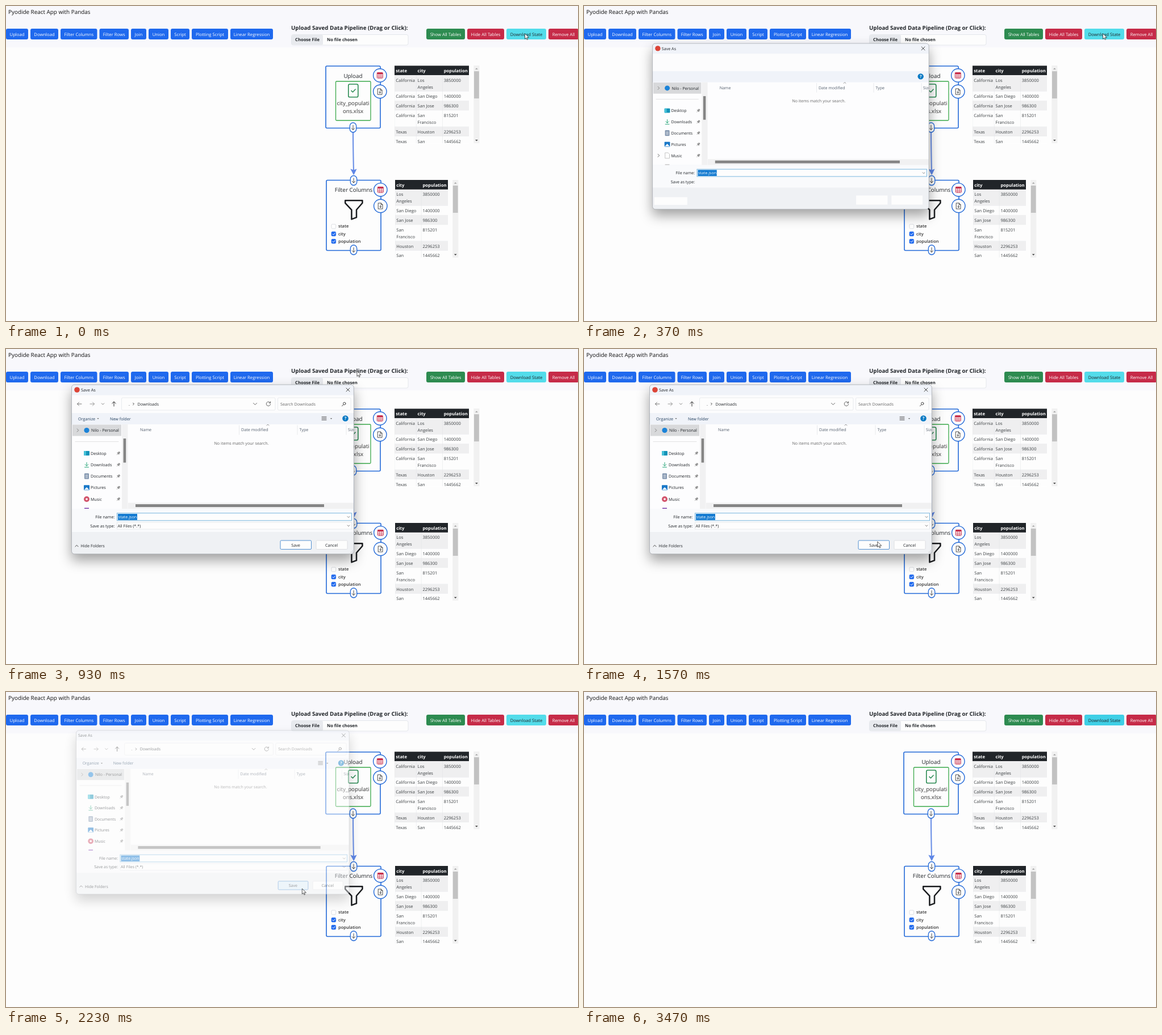
An HTML page for the animation above (3510 ms loop, 1007 by 556 pixels).

```html
<!DOCTYPE html>
<html lang="en">
<head>
<meta charset="utf-8">
<title>Data pipeline</title>
<style>
html, body { margin: 0; width: 100%; height: 100%; overflow: hidden; background: #fdfdfd; }
svg { display: block; width: 1007px; height: 556px; }
text { font-family: "Open Sans", "Noto Sans", sans-serif; text-rendering: geometricPrecision; white-space: pre; }
#dialog { filter: drop-shadow(0 11px 11px rgba(0, 0, 0, .36)); }
</style>
</head>
<body>
<svg id="stage" viewBox="0 0 1007 556"></svg>
<script>
const LOOP = 3510, BLUE = '#1f69ee', EDGE = '#2269d8', INK = '#212529';

// Shape helpers, each returning SVG markup
const rect = (x, y, x2, y2, fill, rest = '') =>
  `<rect x="${x}" y="${y}" width="${x2 - x}" height="${y2 - y}" fill="${fill}" ${rest}/>`;
const path = (d, stroke, width = 1, fill = 'none') =>
  `<path d="${d}" stroke="${stroke}" stroke-width="${width}" fill="${fill}" stroke-linecap="round" stroke-linejoin="round"/>`;
const disc = (x, y, r, fill, rest = '') => `<circle cx="${x}" cy="${y}" r="${r}" fill="${fill}" ${rest}/>`;
const text = (x, y, s, size, fill = INK, anchor = 'start', weight = 400) =>
  `<text x="${x}" y="${y}" font-size="${size}" fill="${fill}" text-anchor="${anchor}" font-weight="${weight}">${s}</text>`;
const border = (color, width, r) => `stroke="${color}" stroke-width="${width}" rx="${r}"`;
const chevron = (x, y, dir, color = '#555', s = 2.6) => path({
  down: `M${x - s} ${y - s / 2}l${s} ${s}l${s} ${-s}`,
  up: `M${x - s} ${y + s / 2}l${s} ${-s}l${s} ${s}`,
  right: `M${x - s / 2} ${y - s}l${s} ${s}l${-s} ${s}`
}[dir], color, .9);
const triangle = (x, y, s, color) => `<path d="M${x - Math.abs(s)} ${y - s / 2}h${2 * Math.abs(s)}l${-Math.abs(s)} ${s}z" fill="${color}"/>`;

const button = (x, x2, label, fill = BLUE, id = '') =>
  rect(x, 40, x2, 59, fill, `rx="3" ${id && `id="${id}"`}`) + text((x + x2) / 2, 52.5, label, 7.7, id ? INK : '#fff', 'middle');

function header() {
  const tools = [[0, 39, 'Upload'], [43, 92, 'Download'], [96, 160.5, 'Filter Columns'], [164.5, 216, 'Filter Rows'],
    [220, 247, 'Join'], [251, 286, 'Union'], [290, 323, 'Script'], [327, 391, 'Plotting Script'], [395, 470, 'Linear Regression']];
  return rect(0, 0, 1007, 73, '#f8f8fc') +
    text(4, 13.7, 'Pyodide React App with Pandas', 9.9, '#111') +
    tools.map(b => button(...b)).join('') +
    text(502, 42.3, 'Upload Saved Data Pipeline (Drag or Click):', 9.7, INK, 'start', 700) +
    rect(502.5, 50.5, 708, 69, '#fdfdfd', border('#dfe2e7', .8, 3)) +
    rect(503, 51, 558, 68.5, '#e8eaee', 'rx="2"') +
    text(530.5, 62.4, 'Choose File', 7.6, INK, 'middle', 700) +
    text(565, 62.4, 'No file chosen', 7.6, INK, 'start', 700) +
    button(740, 808, 'Show All Tables', '#2d8b50') +
    button(812, 877, 'Hide All Tables', '#c62b48') +
    button(881, 951, 'Download State', '#53dcea', 'hover') +
    button(955, 1008, 'Remove All', '#c62b48');
}

const pill = (x, y) =>
  rect(x - 5.7, y - 8.5, x + 5.7, y + 8.5, '#fdfdfd', border(EDGE, 1.3, 5.7)) +
  path(`M${x} ${y - 4}v8m-2.8 -2.8l2.8 2.8l2.8 -2.8`, '#222', .8);

const ring = (x, y) => disc(x, y, 11.7, '#fdfdfd', `stroke="${EDGE}" stroke-width="1.4"`);

// Round table and download toggles on a node's right edge
const toggles = (x, y) =>
  ring(x, y) + rect(x - 5, y - 5, x + 5, y + 5, '#fff', border('#c62b48', .9, 1)) +
  rect(x - 5, y - 5, x + 5, y - 2, '#c62b48', 'rx="1"') +
  path(`M${x - 5} ${y + .6}h10M${x - 5} ${y + 3}h10M${x - 1.7} ${y - 2}v7M${x + 1.7} ${y - 2}v7`, '#c62b48', .7) +
  ring(x, y + 28.6) +
  path(`M${x - 3.7} ${y + 23.6}h4.8l2.6 2.6v7.6h-7.4zM${x + 1} ${y + 23.8}v2.6h2.5M${x} ${y + 27.4}v4m-1.6 -1.5l1.6 1.5l1.6 -1.5`, '#222', .8);

const node = (x, y, h, title) =>
  rect(x, y, x + 96, y + h, '#fdfdfd', border(EDGE, 1.6, 2)) + text(x + 48, y + 20.6, title, 9.9, INK, 'middle');

function checkbox(y, label, on) {
  return rect(573, y, 580.6, y + 7.6, on ? BLUE : '#fff', border(on ? BLUE : '#cfd3d8', .7, 1.6)) +
    (on ? path(`M574.8 ${y + 4}l1.6 1.6l2.8 -3.2`, '#fff', 1) : '') +
    text(585, y + 6.2, label, 7.5, '#333', 'start', 600);
}

function nodes() {
  return path('M611 222Q611 250 612 291', '#6a8fe6', 2.1) +
    '<path d="M606.3 287.5l5.8 2l5.5 -2l-5.4 11z" fill="#5f87e6"/>' +
    node(563, 106, 109.5, 'Upload') +
    rect(580.5, 133, 642, 202, '#fdfdfd', border('#3aa94a', 1.3, 1.5)) +
    rect(602.8, 138, 619.8, 160.8, 'none', border('#2a8a52', 1.6, 2.4)) +
    path('M608 149.6l2.5 2.4l4.6 -5', '#2a8a52', 1.5) +
    text(611, 174.6, 'city_populati', 9.7, '#333', 'middle') + text(611, 189.4, 'ons.xlsx', 9.7, '#333', 'middle') +
    toggles(658.3, 122.4) + pill(611, 214.5) +
    node(564, 307.5, 124, 'Filter Columns') +
    path('M597.2 343.2h30.2v4.6l-10.4 12v13.4l-8.6 3.2v-16.6l-11.2 -12z', '#1b1d20', 2.5) +
    checkbox(385.2, 'state') + checkbox(398.4, 'city', 1) + checkbox(411.5, 'population', 1) +
    toggles(659.3, 324.3) + pill(612, 308) + pill(612, 430.5);
}

const CITIES = [['California', 'Los Angeles', 3850000], ['California', 'San Diego', 1400000], ['California', 'San Jose', 986300],
  ['California', 'San Francisco', 815201], ['Texas', 'Houston', 2296253], ['Texas', 'San', 1445662]];

// cols: [left edge, heading, index into a row]
function table(y, cols, right, barX, clip) {
  const left = cols[0][0];
  let out = '', top = y + 16.8;
  CITIES.forEach((row, i) => {
    const wraps = /Angeles|Francisco/.test(row[1]), h = wraps ? 28.8 : 16.8;
    out += rect(left, top, right, top + h, i % 2 ? '#fdfdfd' : '#efeff0') + path(`M${left} ${top + h}H${right}`, '#dfe1e4', .5);
    for (const [x, , k] of cols) {
      const lines = k === 1 && wraps ? row[1].split(' ') : [row[k]];
      lines.forEach((s, n) => out += text(x + 2.3, top + 11.5 + 12 * n, s, 7.5, '#3c4043'));
    }
    top += h;
  });
  out += cols.map(([x]) => path(`M${x} ${y}V${top}`, '#dfe1e4', .5)).join('') + rect(left, y, right, y + 16.8, INK) +
    cols.map(([x, s]) => text(x + 2.3, y + 11.6, s, 7.7, '#fff', 'start', 700)).join('');
  return `<clipPath id="${clip}">${rect(left, y, right, y + 137, '#000')}</clipPath><g clip-path="url(#${clip})">${out}</g>` +
    rect(barX, y, barX + 10, y + 137, '#f1f1f1') + rect(barX + .6, y + 10, barX + 9.4, y + 58, '#c2c2c2') +
    triangle(barX + 5, y + 5.4, -2.4, '#9a9a9a') + triangle(barX + 5, y + 132, 2.4, '#444');
}

function tree() {
  const pin = y => path(`M195.4 ${y + 2.6}l2 -2m-1.4 -1.2l2.8 2.8l.3 -1.7l1.7 -1.6l-1.8 -1.8l-1.5 1.7z`, '#777', .7, '#999');
  const page = y => path(`M138.5 ${y - 5}h5l2.5 2.5v7.5h-7.5z`, '#aaa', .7, '#fff');
  const icons = [
    y => rect(137, y - 4, 147, y + 4, '#1593b8', 'rx="1"') + rect(137, y - 4, 141, y + 4, '#45c1d8', 'rx="1"'),
    y => path(`M142 ${y - 4}v6m-2.8 -2.6l2.8 2.8l2.8 -2.8M138.5 ${y + 4.4}h7`, '#27a579', 1),
    y => rect(138, y - 5, 146, y + 5, '#7f93ad', 'rx="1"') + path(`M140 ${y - 2}h4m-4 2.2h4m-4 2.2h4`, '#fff', .8),
    y => rect(137, y - 4.5, 147, y + 4.5, '#1978c8', 'rx="1"') + path(`M138 ${y + 3.6}l4 -4.2l4 4.2z`, '#fff', .4, '#fff'),
    y => `<g class="full">${disc(142, y, 5, '#d2546c')}${disc(142, y, 1.8, '#fff')}</g><g class="bare">${page(y)}${chevron(126.5, y, 'right')}</g>`
  ];
  return rect(117, 133.5, 203, 153.5, '#d8d9db') + chevron(126.5, 143.5, 'right', '#777') + disc(142, 143.5, 4.6, '#1b83d8') +
    text(150, 146.2, 'Nilo - Personal', 7.2) + path('M122 163.5H198', '#dcdcdc', .8) +
    ['Desktop', 'Downloads', 'Documents', 'Pictures', 'Music'].map((s, i) => {
      const y = 184 + 20.25 * i;
      return icons[i](y) + text(149, y + 2.7, s, 7.2) + pin(y);
    }).join('') +
    `<g class="full">${rect(138, 280.4, 146, 282, '#8044b0')}</g><g class="bare">${rect(138, 280.8, 146, 282, '#bbb')}</g>` +
    rect(204, 133, 214.5, 282, '#f1f1f2') + rect(206.6, 158, 211.2, 200.5, '#858585');
}

// Parts of the dialog that appear once it has loaded
function controls() {
  return rect(203.5, 86, 474, 108, '#fdfdfd', border('#e4e6ea', .8, 2)) + rect(478.5, 86, 607, 108, '#fdfdfd', border('#e4e6ea', .8, 2)) +
    path('M133 97h-7.5m3 -3l-3 3l3 3', '#666', .9) + path('M148 97h7.5m-3 -3l3 3l-3 3', '#888', .9) + chevron(170.5, 97, 'down', '#777', 2.2) +
    path('M190 101v-8m-3.2 3.2l3.2 -3.2l3.2 3.2', '#333', 1) +
    text(216, 99.6, '.', 7.2) + chevron(224.5, 97, 'right', '#333', 1.8) + text(231.5, 99.6, 'Downloads', 7.2) +
    chevron(438.5, 97, 'down', '#555', 3) + path('M465 94.7a3.7 3.7 0 1 0 .6 2.8M465.6 92.8v2.5h-2.4', '#555', .9) +
    text(483, 99.6, 'Search Downloads', 7.2, '#666') + path('M594 98.3l-2.6 2.4M598 96.3a2.2 2.2 0 1 1 -4.4 0a2.2 2.2 0 1 1 4.4 0', '#333', .9) +
    text(127, 125.5, 'Organize', 7.2, '#24405f') + triangle(162, 123, 1.7, '#444') + text(183, 125.5, 'New folder', 7.2, '#24405f') +
    path('M556 119.5h8m-8 2h8m-8 2h8m-8 2h8', '#555', .8) + triangle(572.5, 123, 1.7, '#444') +
    rect(195.5, 306, 608.5, 318, '#fdfdfd', border('#dfe2e6', .7, 0)) + text(196.5, 314.6, 'All Files (*.*)', 7.2) + chevron(603, 312, 'down', '#777', 2) +
    chevron(124.5, 347.5, 'up', '#333') + text(131.5, 350, 'Hide Folders', 7.2) +
    rect(483, 338, 537.5, 353.5, '#fdfdfd', border('#3f84cc', .9, 1.5) + ' id="save"') + text(510, 348.6, 'Save', 7.2, INK, 'middle') +
    rect(546, 338, 601, 353.5, '#fdfdfd', border('#d8dade', .8, 1.5)) + text(573, 348.6, 'Cancel', 7.2, INK, 'middle') +
    path('M610 356v.1m0 2.4v.1m-2.4 0v.1', '#999', 1);
}

function dialog() {
  const heads = [[236, 'Name'], [414, 'Date modified'], [516.5, 'Type'], [602, 'Size']];
  const frame = rect(115.5, 63, 612.3, 361.8, '#f0f3f9', 'rx="5"');
  return `<clipPath id="window">${frame}</clipPath>${frame}<g clip-path="url(#window)">` +
    rect(115, 81.5, 613, 113, '#fcfcfd') + rect(115, 133, 613, 282, '#fdfdfe') + rect(115, 282, 613, 323, '#f9fafc') +
    rect(115, 323, 613, 362, '#eff1f4') +
    `<g id="logo">${disc(125, 72, 4.8, '#dc4437')}</g>` + `<g id="caption">${text(132, 74.7, 'Save As', 7.3)}</g>` +
    path('M599 69l6 6m0 -6l-6 6', '#333', .9) +
    disc(597.5, 122.5, 5.3, '#0a7ac4') + text(597.5, 125.3, '?', 7.6, '#fff', 'middle', 700) + tree() +
    heads.map(([x, s]) => text(x, 145.2, s, 7.2, '#55606e')).join('') +
    path('M410.5 135v16M513 135v16M599 135v16', '#e3e5e8', .8) + chevron(461, 134, 'up', '#888', 2) +
    text(414.5, 168.8, 'No items match your search.', 7.2, '#666', 'middle') +
    rect(215, 271.5, 613, 282, '#f1f1f2') + rect(228, 274, 560, 279, '#858585') +
    text(191.5, 299, 'File name:', 7.2, INK, 'end') + text(191.5, 314.8, 'Save as type:', 7.2, INK, 'end') +
    rect(195.5, 289.7, 608.5, 302.8, '#fdfdfd', border('#6aaedb', .9, 0)) + rect(197, 291, 231, 301.8, '#0f78d0') +
    text(197.8, 298.8, 'state.json', 7.2, '#fff') + chevron(603, 296.5, 'down', '#777', 2) +
    `<g class="bare">${rect(118.6, 340, 178, 354, '#fdfdfd')}${rect(481.5, 337, 538, 353.5, '#fdfdfd')}${rect(545, 337, 601, 353.5, '#fdfdfd')}</g>` +
    `<g class="full">${controls()}</g></g>` +
    rect(115.5, 63, 612.3, 361.8, 'none', border('#9a9ea5', .7, 5));
}

const $ = id => document.getElementById(id);
$('stage').innerHTML = header() + nodes() +
  table(105.2, [[684, 'state', 0], [722.3, 'city', 1], [768.4, 'population', 2]], 815, 823.4, 'table1') +
  table(307, [[685, 'city', 1], [731.2, 'population', 2]], 778, 786.2, 'table2') +
  `<g id="dialog">${dialog()}</g>` +
  `<g id="cursor">${path('M0 0v9.2l2.2 -2l1.5 3.3l1.5 -.7l-1.5 -3.2h3z', '#222', .75, '#fff')}</g>`;

// Pointer stops: time, x, y and the easing used to reach them
const easeIn = p => p * p, easeOut = p => 1 - (1 - p) ** 3, linear = p => p;
const STOPS = [[0, 913.5, 49], [600, 913.5, 49, linear], [930, 618.5, 37.5, easeIn], [1480, 516.7, 340.5, easeOut],
  [1900, 516.7, 340.5, linear], [2050, 521.3, 347.5, easeOut], [2290, 521.3, 347.5, linear],
  [2630, 527.6, 28.5, easeIn], [2680, 529, -20, linear], [LOOP, 529, -20, linear]];

function pointer(t) {
  const i = STOPS.findIndex(s => s[0] > t), [t0, x0, y0] = STOPS[i - 1], [t1, x1, y1, ease] = STOPS[i];
  const p = ease((t - t0) / (t1 - t0));
  return [x0 + (x1 - x0) * p, y0 + (y1 - y0) * p];
}

const clamp = v => Math.min(1, Math.max(0, v));
const show = (el, on) => el.style.display = on ? '' : 'none';
const OPEN = 330, READY = 470, CLOSE = 2150;

function draw() {
  const t = performance.now() % LOOP, closing = clamp((t - CLOSE) / 150);
  const scale = 1 - .05 * (1 - easeOut(clamp((t - OPEN) / 160))) - .06 * closing;
  const win = $('dialog');
  show(win, t >= OPEN && closing < 1);
  win.setAttribute('transform', `translate(363.7 212.4) scale(${scale}) translate(-363.7 -212.4)`);
  win.setAttribute('opacity', clamp((t - OPEN) / 38) * (1 - closing));
  document.querySelectorAll('.full').forEach(el => show(el, t >= READY));
  document.querySelectorAll('.bare').forEach(el => show(el, t < READY));
  show($('logo'), t < CLOSE);
  $('caption').setAttribute('transform', `translate(${t < CLOSE ? 0 : -13} 0)`);
  $('save').setAttribute('fill', t > 1600 ? '#dcecf8' : '#fdfdfd');
  $('hover').setAttribute('fill', t < 2300 ? '#53dcea' : '#3fcfe6');
  $('cursor').setAttribute('transform', `translate(${pointer(t)})`);
  requestAnimationFrame(draw);
}
draw();
</script>
</body>
</html>
```
